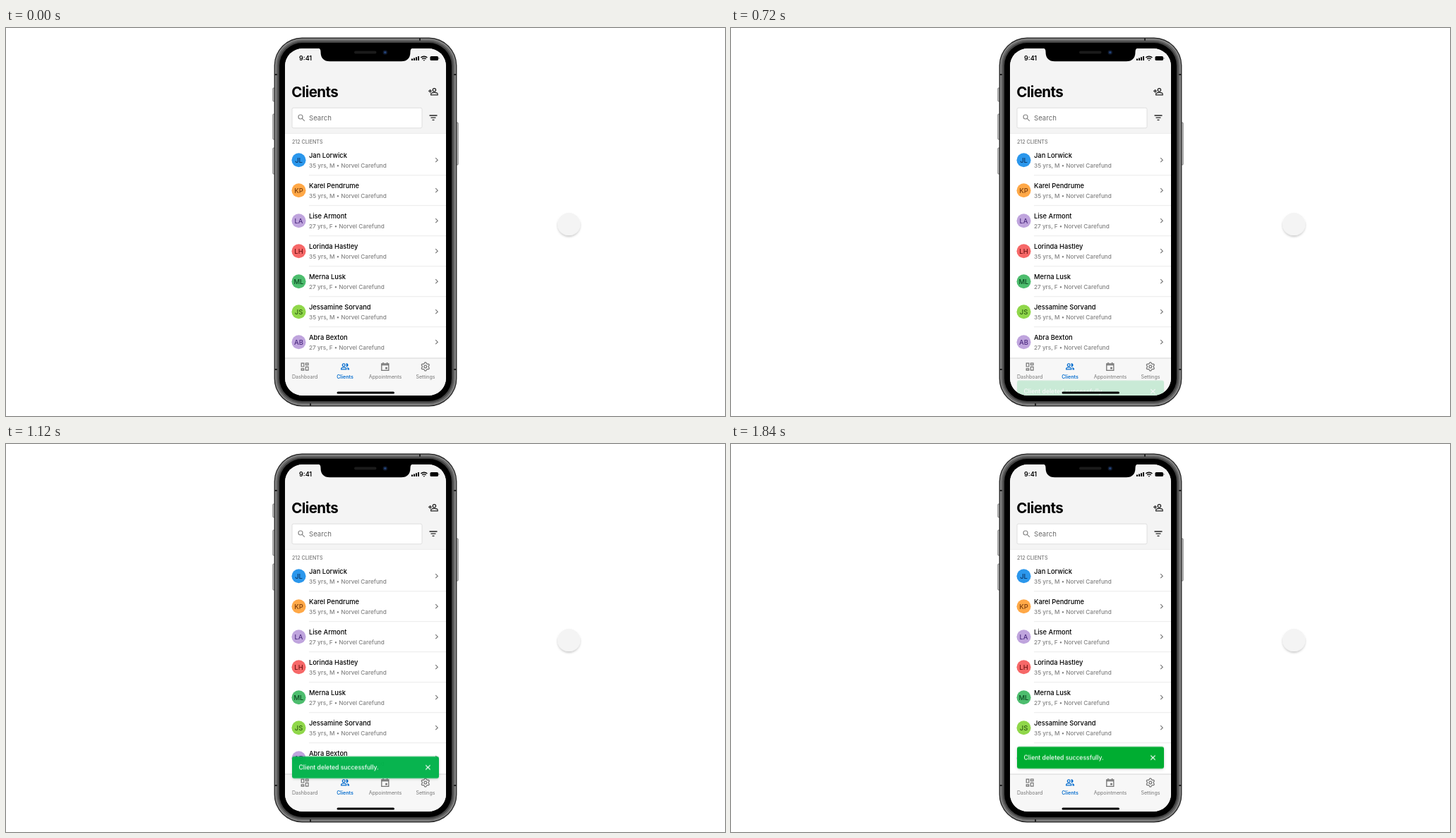
Write an HTML page that moves like this. It is 1018 by 550 pixels and loops after 1880 ms.

```html
<!DOCTYPE html>
<html lang="en">
<head>
<meta charset="utf-8">
<title>Clients</title>
<style>
  html, body { margin: 0; width: 100%; height: 100%; overflow: hidden; background: #fff; }
  svg { display: block; }
  text { font-family: Inter, Roboto, sans-serif; font-weight: 500; }
  .title { font-size: 20.5px; font-weight: 700; letter-spacing: -.6px; }
  .time { font-size: 9px; font-weight: 600; }
  .search { font-size: 9.6px; font-weight: 400; fill: #6a6a6a; }
  .count { font-size: 7.1px; fill: #777; }
  .name { font-size: 9.3px; fill: #000; }
  .detail { font-size: 8.2px; fill: #828282; }
  .initials { font-size: 9.4px; text-anchor: middle; }
  .tab { font-size: 7.05px; font-weight: 400; fill: #777; text-anchor: middle; }
  .tab.active { font-weight: 600; fill: #0b70cf; }
  .line { fill: none; stroke: currentColor; stroke-width: 1.2; }
  .toast { animation: rise 1880ms infinite, fade 1880ms linear infinite; }
  .toast rect { animation: tint 1880ms linear infinite; filter: drop-shadow(0 1px 2px rgba(0, 0, 0, .16)); }
  .toast text { font-size: 8.6px; font-weight: 450; fill: #fff; }
  /* cubic ease-out, 667 ms to 1667 ms */
  @keyframes rise {
    0%, 35.48% { transform: translateY(83.4px); animation-timing-function: cubic-bezier(.33, 1, .68, 1); }
    88.67%, 100% { transform: translateY(0); }
  }
  @keyframes fade {
    0%, 35.1% { opacity: 0; }
    44.68% { opacity: .55; }
    51.06% { opacity: .75; }
    59.57% { opacity: .97; }
    64%, 100% { opacity: 1; }
  }
  @keyframes tint {
    0%, 59.57% { fill: #00b24a; }
    76.6%, 100% { fill: #00ad31; }
  }
</style>
</head>
<body>
<svg width="1018" height="550" viewBox="0 0 1018 550">
  <defs>
    <clipPath id="screen"><rect x="395" y="29" width="228" height="492" rx="25"/></clipPath>
    <filter id="soft" x="-50%" y="-50%" width="200%" height="200%">
      <feDropShadow dx="0" dy="2" stdDeviation="1.5" flood-opacity=".2"/>
    </filter>
  </defs>

  <circle cx="797" cy="278" r="16" fill="#f4f4f4" filter="url(#soft)"/>

  <!-- phone body -->
  <g fill="#c4c4c4" stroke="#4a4a4a" stroke-width=".6">
    <rect x="377.8" y="85" width="4" height="19" rx="1"/>
    <rect x="377.8" y="122" width="4" height="36" rx="1"/>
    <rect x="377.8" y="170" width="4" height="37" rx="1"/>
    <rect x="636.2" y="134" width="4" height="60" rx="1"/>
  </g>
  <rect x="379.6" y="13.6" width="258.8" height="522.8" rx="39.5" fill="#2a2a2a"/>
  <rect x="381" y="15" width="256" height="520" rx="38" fill="#8c8c8c"/>
  <rect x="382.6" y="16.6" width="252.8" height="516.8" rx="36.5" fill="#666"/>
  <rect x="384.8" y="18.8" width="248.4" height="512.4" rx="34.5" fill="#444"/>
  <rect x="387" y="21" width="244" height="508" rx="32.5" fill="#000"/>
  <path d="M586 14v4M431 532v4M380 66h4M634 66h4M380 484h4M634 484h4" stroke="#222" stroke-width="2"/>

  <g clip-path="url(#screen)">
    <rect x="395" y="29" width="228" height="492" fill="#fff"/>
    <rect x="395" y="29" width="228" height="120.5" fill="#f4f4f4"/>
    <path d="M395 149.5h228" stroke="#ededed"/>

    <!-- status bar -->
    <text class="time" x="415" y="46.2">9:41</text>
    <path d="M575 46v-2.4M578 46v-3.6M581 46v-4.8M584 46v-6" stroke="#000" stroke-width="2"/>
    <g fill="none" stroke="#000" stroke-width="1.4">
      <path d="M587.4 42.1a6.3 6.3 0 0 1 9 0M589.2 44a3.8 3.8 0 0 1 5.4 0"/>
    </g>
    <path d="M590.5 45.3h2.8l-1.4 1.5z"/>
    <rect x="600.5" y="40" width="11.5" height="6" rx="1.6"/>
    <path d="M613 42v2" stroke="#777"/>

    <!-- header -->
    <text class="title" x="404.2" y="98.2">Clients</text>
    <g class="line" color="#222">
      <circle cx="606.4" cy="87.8" r="2.2"/>
      <path d="M601.6 94.8v-1.1c0-1.6 3-2.3 4.8-2.3s4.8.7 4.8 2.3v1.1zM598 89.4h5M600.5 86.9v5"/>
    </g>
    <rect x="405" y="113.2" width="184" height="28.6" rx="2" fill="#fff" stroke="#dedede"/>
    <g class="line" color="#888">
      <circle cx="417" cy="126" r="3"/><path d="M419.2 128.2l3.6 3.6"/>
    </g>
    <text class="search" x="429" y="131">Search</text>
    <path d="M599.5 124h11M601.5 127.2h7M603.5 130.4h3" stroke="#222" stroke-width="1.3"/>

    <text class="count" x="405" y="163.7">212 CLIENTS</text>
    <g id="rows"></g>

    <!-- tab bar -->
    <rect x="395" y="468" width="228" height="53" fill="#f7f7f7"/>
    <path d="M395 468h228" stroke="#d6d6d6"/>
    <g class="line" color="#747474">
      <path d="M418.2 475.2h3.6v4.8h-3.6zM424.4 475.2h3.6v2.4h-3.6zM418.2 482.8h3.6v2.4h-3.6zM424.4 480.4h3.6v4.8h-3.6z"/>
      <path d="M531.8 476h10v9.3h-10zM531.8 477.6h10M534 474v2M539.6 474v2" stroke-width="1.3"/>
      <path d="M537.2 480.8h2.6v2.6h-2.6z" fill="currentColor" stroke="none"/>
      <path id="gear" stroke-linejoin="round"/><circle cx="593.8" cy="480" r="1.9"/>
    </g>
    <g class="line" color="#0b70cf">
      <circle cx="478.2" cy="477.8" r="1.9"/>
      <path d="M474.6 483.8v-.8c0-1.3 2.2-1.9 3.6-1.9s3.6.6 3.6 1.9v.8z"/>
      <path d="M481.4 475.4a2.5 2.5 0 1 1 0 4.8q1.2-2.4 0-4.8zM482.6 480.9c1.8.2 3.5 1 3.5 2.3v1.2h-2.5v-1.4q0-1.2-1-2.1z" fill="currentColor" stroke="none"/>
    </g>
    <text class="tab" x="423.2" y="497.2">Dashboard</text>
    <text class="tab active" x="480" y="497.2">Clients</text>
    <text class="tab" x="537" y="497.2">Appointments</text>
    <text class="tab" x="594" y="497.2">Settings</text>

    <g class="toast">
      <rect x="405" y="429" width="208" height="31.2" rx="3"/>
      <text x="414.5" y="447.6">Client deleted successfully.</text>
      <path d="M594.2 441.4l6.4 6.4M600.6 441.4l-6.4 6.4" stroke="#fff" stroke-width="1.2"/>
    </g>
    <rect x="468.5" y="515.4" width="81.5" height="3" rx="1.5"/>
  </g>

  <!-- notch -->
  <path d="M441 28.5q4.5 0 4.5 5q0 13.8 13 13.8h101q13 0 13-13.8q0-5 4.5-5z"/>
  <rect x="493" y="32.6" width="31.5" height="3.8" rx="1.9" fill="#1b1b1b"/>
  <circle cx="536.8" cy="34.6" r="3.2" fill="#10192c"/>
  <circle cx="536.8" cy="34.6" r="1.6" fill="#24457c"/>
</svg>
<script>
  const clients = [
    ["Jan Lorwick", "#2b97ec", "#0a3566"],
    ["Karel Pendrume", "#ffa847", "#7c3c0c"],
    ["Lise Armont", "#bfa4dd", "#4d2c80"],
    ["Lorinda Hastley", "#f66868", "#701414"],
    ["Merna Lusk", "#4dbd6e", "#0b4a22"],
    ["Jessamine Sorvand", "#90d74a", "#2e5b12"],
    ["Abra Bexton", "#bfa4dd", "#4d2c80"]
  ];
  const rowHeight = 43;

  const row = ([name, fill, ink], i) => {
    const initials = name.split(" ").map(word => word[0]).join("");
    const person = i % 2 || i === 0 ? "35 yrs, M" : "27 yrs, F";
    const divider = i < clients.length - 1 ? '<path d="M429 208.7h194" stroke="#ebebeb"/>' : "";
    return `<g transform="translate(0 ${i * rowHeight})">
      <circle cx="414.5" cy="187.2" r="10" fill="${fill}"/>
      <text class="initials" x="414.5" y="190.7" fill="${ink}">${initials}</text>
      <text class="name" x="429" y="184.4">${name}</text>
      <text class="detail" x="429" y="198.2">${person} • Norvel Carefund</text>
      <path class="line" color="#777" d="M608.2 184.2l3 3l-3 3"/>${divider}</g>`;
  };
  document.getElementById("rows").innerHTML = clients.map(row).join("");

  // Six teeth: two outer points, then two inner points
  const gearPoints = Array.from({ length: 24 }, (_, i) => {
    const radius = i % 4 < 2 ? 6 : 4.5;
    const angle = (i - .5) * Math.PI / 12 + Math.PI / 6;
    return `${593.8 + radius * Math.cos(angle)} ${480 + radius * Math.sin(angle)}`;
  });
  document.getElementById("gear").setAttribute("d", `M${gearPoints.join("L")}Z`);
</script>
</body>
</html>
```
